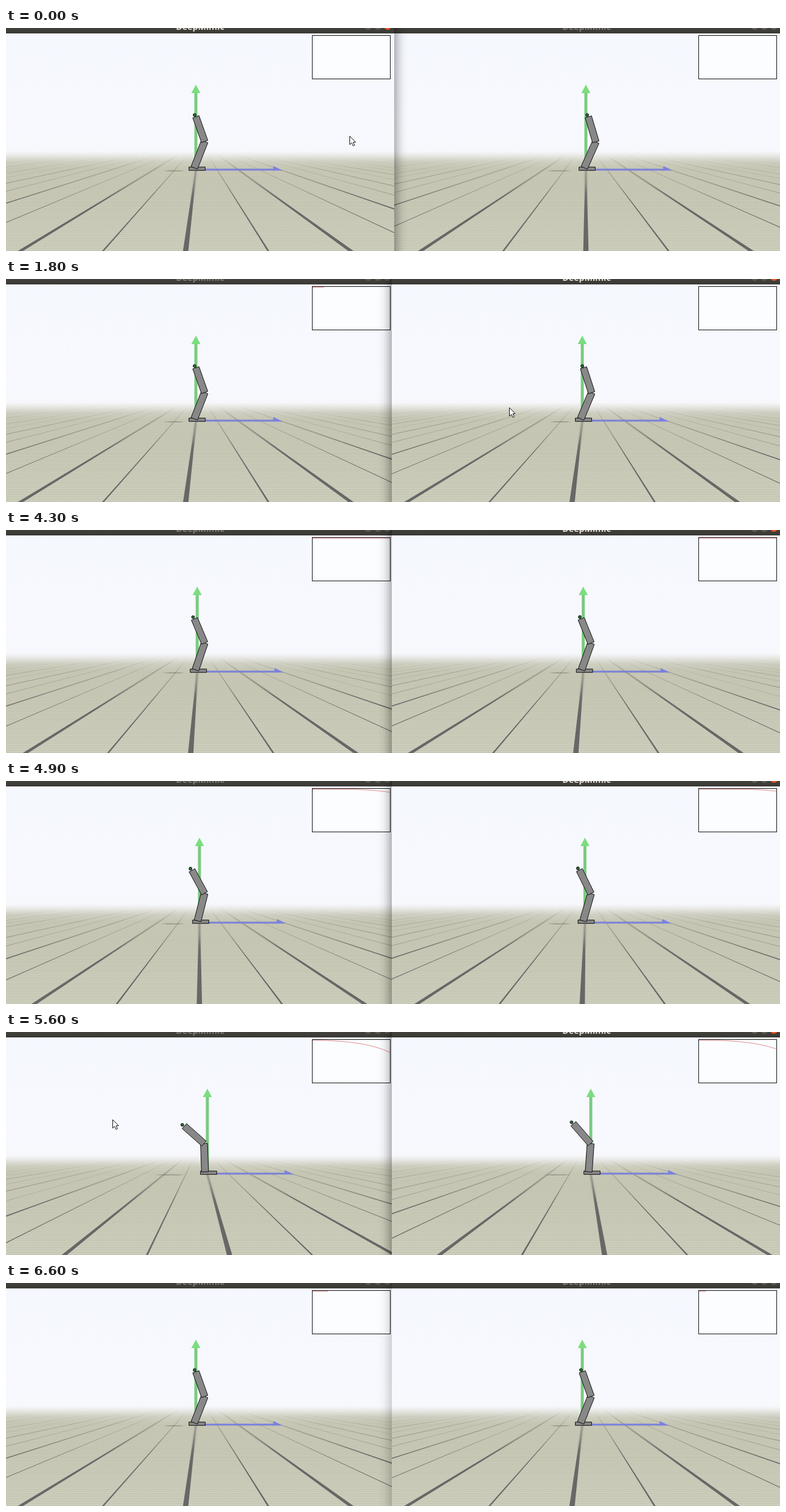
These frames come from a looping animation (1280x370 px, 6.7 s). An HTML page with a canvas:

```html
<!DOCTYPE html>
<html lang="en">
<head>
<meta charset="utf-8">
<title>DeepMimic</title>
<style>
html, body { margin: 0; width: 1280px; height: 370px; overflow: hidden; background: #c9c9b7; }
canvas { display: block; }
</style>
</head>
<body>
<canvas id="stage" width="1280" height="370"></canvas>
<script>
const ctx = document.getElementById('stage').getContext('2d');
const LOOP = 6700, STEP = 100, BOTTOM = 370;
const CX = 320, HORIZON = 189, DEPTH = 3.82, SPACING = 136.7;
const REST = 314, THIGH = 43.5, SHIN = 47, RATE = 0.076;
const rad = deg => deg * Math.PI / 180;

const wins = [
  { x: 0, left: 0, right: 642, lag: 0, start: 1550, reset: 6270 },
  { x: 639, left: 638, right: 1280, lag: 180, start: 1800, reset: 6455 }
];

// time, x, y (no position: hidden)
const POINTER = [[0, 568, 179], [600, 672, 193], [900, 840, 193], [1400, 832, 213], [2000], [5600, 176, 145], [5700]];

function gradient(x0, y0, x1, y1, stops) {
  const g = ctx.createLinearGradient(x0, y0, x1, y1);
  stops.forEach(([p, c]) => g.addColorStop(p, c));
  return g;
}
const vertical = (y0, y1, stops) => gradient(0, y0, 0, y1, stops);
const tone = (rgb, stops) => stops.map(([p, a]) => [p, `rgba(${rgb},${a})`]);

function shape(points, fill, stroke) {
  ctx.beginPath();
  points.forEach(([x, y]) => ctx.lineTo(x, y));
  ctx.closePath();
  ctx.fillStyle = fill;
  ctx.fill();
  if (!stroke) return;
  ctx.strokeStyle = stroke;
  ctx.lineWidth = 1;
  ctx.stroke();
}

function disc(x, y, r, fill) {
  ctx.beginPath();
  ctx.arc(x, y, r, 0, 7);
  ctx.fillStyle = fill;
  ctx.fill();
}

// Tilt in degrees: an unstable balance drifts away exponentially
const tilt = t => 56 * Math.exp((t - 6000) / 602);

function pose(t, win) {
  const fall = t < win.reset ? tilt(t - win.lag) : 0;
  const settle = win.lag ? 3 * Math.exp(-Math.max(0, t - 1600) / 300) : 0;
  const waiting = win.lag && t < 1600;
  return { base: REST + 0.66 * fall + (waiting ? 6 : 0), fall, lean: fall - settle };
}

function ground(base) {
  ctx.fillStyle = vertical(0, BOTTOM, [
    [0, '#f5f8ff'], [0.5, '#f8f9fe'], [0.553, '#f7f8fc'], [0.575, '#e6e6e2'],
    [0.6, '#cfcfc1'], [0.63, '#c7c7b5'], [1, '#cccdbb']
  ]);
  ctx.fillRect(-2, 0, 652, BOTTOM);

  ctx.fillStyle = '#a4a48c';
  for (let y = 228; y < BOTTOM; y += (y - HORIZON) / 42) {
    ctx.globalAlpha = Math.min(0.22, (y - 222) / 300);
    ctx.fillRect(-2, Math.round(y), 652, 1);
  }
  ctx.globalAlpha = 1;

  const sharp = vertical(210, 300, tone('100,100,100', [[0, 0], [0.25, 0.24], [0.5, 0.5], [0.75, 0.9], [1, 0.97]]));
  const soft = vertical(210, 282, tone('100,100,100', [[0, 0], [0.35, 0.2], [1, 0]]));
  for (let k = -16; k <= 16; k++) {
    const x = CX + (base - CX) * DEPTH + k * SPACING, w = k % 2 ? 1.6 : 4.4;
    const ray = r => [[CX, HORIZON], [x - r, BOTTOM], [x + r, BOTTOM]];
    shape(ray(w * 2.3), soft);
    shape(ray(w), sharp);
  }

  const from = 262 - 0.75 * (base - REST);
  ctx.fillStyle = gradient(from, 0, 295, 0, tone('90,90,80', [[0, 0.2], [0.3, 0.75], [0.8, 0.6], [1, 0]]));
  ctx.fillRect(from, 236.5, 295 - from, 1);
}

function axes(x) {
  ctx.fillStyle = '#7acb7f';
  ctx.fillRect(x - 2.5, 107, 5, 128);
  shape([[x - 7.5, 108], [x, 94], [x + 7.5, 108]], '#7bdd7f');
  ctx.fillStyle = '#7a80da';
  ctx.fillRect(x, 233.5, 130, 3);
  shape([[x + 128, 229], [x + 143.5, 236.5], [x + 128, 236.5]], '#7a80e0');
}

// Box of width w from (x, y), len long at an angle clockwise from up; returns its far end
function limb(x, y, angle, len, w) {
  const s = Math.sin(rad(angle)), c = Math.cos(rad(angle)), h = w / 2;
  const ex = x + s * len, ey = y - c * len;
  shape([[x - c * h, y - s * h], [ex - c * h, ey - s * h], [ex + c * h, ey + s * h], [x + c * h, y + s * h]], '#888', '#111');
  return [ex, ey];
}

function leg({ base, fall, lean }) {
  const lift = Math.max(0, fall - 38);
  const fx = base + 2, fy = 233.5 - lift * 0.18, half = 13.5;
  limb(fx - half * Math.cos(rad(lift)), fy + half * Math.sin(rad(lift)), 90 - lift, half * 2, 5.5);
  const [kx, ky] = limb(base - 2.7 - 0.04 * fall, 232 - lift * 0.06, 21.5 - 0.82 * lean, SHIN, 11.5);
  const back = -19.5 - lean;
  const [hx, hy] = limb(kx, ky, back, THIGH, 11);
  const dx = hx + 3.2 * Math.sin(rad(back)) - 1, dy = hy - 3.2 * Math.cos(rad(back));
  disc(dx, dy, 2.8, '#161c16');
  disc(dx, dy, 1.7, '#2f7a38');
}

function graph(t, win) {
  ctx.fillStyle = 'rgba(253,254,255,.85)';
  ctx.fillRect(506.5, 12.5, 129, 72);
  ctx.strokeStyle = '#151515';
  ctx.lineWidth = 1;
  ctx.strokeRect(506.5, 12.5, 129, 72);
  const again = t >= win.reset;
  const n = Math.min(128, Math.floor((t - (again ? win.reset : win.start)) * RATE));
  ctx.fillStyle = '#d95050';
  for (let i = 0; i < n; i++) {
    const past = t - (n - i) / RATE - win.lag;
    const loss = again ? 0 : Math.max(0, 0.78 * tilt(past) - 2);
    ctx.globalAlpha = i % 2 ? 0.4 : 0.9;
    ctx.fillRect(507 + i, 13.3 + loss, 1, 1);
  }
  ctx.globalAlpha = 1;
}

function titleBar(active) {
  ctx.fillStyle = vertical(0, 9, [[0, '#42413b'], [1, '#3a3934']]);
  ctx.fillRect(-2, 0, 652, 9);
  ctx.font = 'bold 14.3px "Open Sans", sans-serif';
  ctx.textAlign = 'center';
  ctx.fillStyle = active ? '#e4e0d8' : '#827f78';
  ctx.fillText('DeepMimic', 321, 3);
  for (let i = 0; i < 3; i++) disc(599 + 16 * i, -3, 6, active && i === 2 ? '#ee5426' : '#5f5d56');
}

function drawWindow(win, t, active) {
  ctx.save();
  ctx.beginPath();
  ctx.rect(win.left, 0, win.right - win.left, BOTTOM);
  ctx.clip();
  ctx.translate(win.x, 0);
  const p = pose(t, win);
  ground(p.base);
  axes(p.base);
  leg(p);
  graph(t, win);
  titleBar(active);
  ctx.restore();
}

function shadow(x, dx, strength) {
  ctx.fillStyle = gradient(x, 0, x + dx, 0, tone('0,0,0', [[0, strength], [0.3, strength * 0.5], [0.6, strength * 0.15], [1, 0]]));
  ctx.fillRect(Math.min(x, x + dx), 0, Math.abs(dx), BOTTOM);
}

function pointer(x, y) {
  const outline = [[0, 0], [0, 14], [3.2, 11], [5.6, 16.2], [8, 15], [5.6, 10.2], [9.6, 9.8]];
  shape(outline.map(([a, b]) => [x + a + 0.5, y + b + 0.5]), '#fff', '#111');
}

function draw(t) {
  const glimpse = t >= 600 && t < 700;
  const front = +(t >= 1200 || glimpse);
  const idle = t >= 6600;
  const focus = idle ? -1 : +(t >= 1400 || glimpse);

  drawWindow(wins[1 - front], t, focus === 1 - front);
  if (front) shadow(638, -23, idle ? 0.17 : 0.28);
  else shadow(642, 23, 0.28);
  drawWindow(wins[front], t, focus === front);

  const [, x, y] = POINTER.filter(p => p[0] <= t).pop();
  if (x !== undefined) pointer(x, y);
}

const began = performance.now();
function tick() {
  const t = (performance.now() - began) % LOOP;
  draw(Math.floor(t / STEP) * STEP);
  requestAnimationFrame(tick);
}
tick();
</script>
</body>
</html>
```
